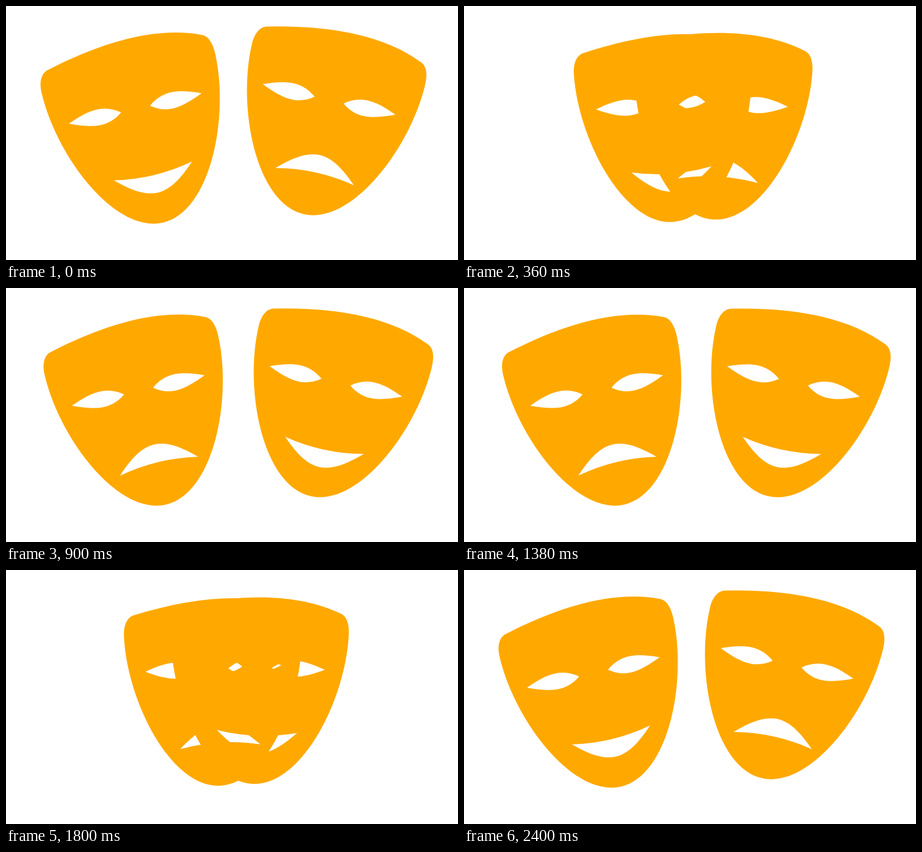
An HTML page with a canvas for the animation above (2.7 s loop, 800x450 px).

```html
<!DOCTYPE html>
<html lang="en">
<head>
<meta charset="utf-8">
<title>Masks</title>
<style>
  html, body { margin: 0; width: 100%; height: 100%; overflow: hidden; background: #fff; }
  canvas { display: block; }
</style>
</head>
<body>
<canvas id="stage" width="800" height="450"></canvas>
<script>
const ctx = document.getElementById('stage').getContext('2d');

const LOOP = 2700, TICK = 30, TILT = 13 * Math.PI / 180;
const LEFT_Y = 211.7, RIGHT_Y = 196.7;

// Resting x of each mask on either side
const smile = { left: 238, right: 579, turn: 1 };
const sad = { left: 243.3, right: 567, turn: -1 };

function addFace(path) {
  path.moveTo(-140, -132);
  path.bezierCurveTo(-30, -160.5, 68, -164, 142, -132);
  path.bezierCurveTo(152, -128, 157.5, -115, 157.5, -96);
  path.bezierCurveTo(157.5, 19, 87.6, 176.6, 0, 176.6);
  path.bezierCurveTo(-87.6, 176.6, -157.5, 19, -157.5, -96);
  path.bezierCurveTo(-157.5, -115, -151, -128, -140, -132);
  path.closePath();
}

// Lens with a sharp outer tip and a blunter inner one
function addEye(path, outer, inner) {
  const dir = Math.sign(inner - outer);
  const a = outer + 38 * dir, b = inner - 28 * dir;
  path.moveTo(outer, -31.5);
  path.bezierCurveTo(a, -47.2, b, -52.2, inner, -30.3);
  path.bezierCurveTo(b, -8.8, a, -15.2, outer, -31.5);
  path.closePath();
}

// turn = -1 is the same mouth rotated by half a turn
function addMouth(path, turn) {
  const p = (x, y) => [3.5 + turn * x, 95.5 + turn * y];
  path.moveTo(...p(-71, -11.2));
  path.quadraticCurveTo(...p(0, 3), ...p(71, -12.8));
  path.bezierCurveTo(...p(16, 40.4), ...p(-16, 40.4), ...p(-71, -11.2));
  path.closePath();
}

for (const mask of [smile, sad]) {
  mask.path = new Path2D();
  addFace(mask.path);
  addEye(mask.path, -122.6, -28.2);
  addEye(mask.path, 118.2, 24.4);
  addMouth(mask.path, mask.turn);
}

const lerp = (a, b, k) => a + (b - a) * k;

function ease(t, start, end) {
  const k = Math.min(1, Math.max(0, (t - start) / (end - start)));
  return k * k * (3 - 2 * k);
}

// side: 0 = left place, 1 = right place
function drawMask(mask, side) {
  ctx.save();
  ctx.translate(lerp(mask.left, mask.right, side), lerp(LEFT_Y, RIGHT_Y, side));
  ctx.rotate(lerp(-TILT, TILT, side));
  ctx.fill(mask.path, 'evenodd');
  ctx.restore();
}

function draw(now) {
  const t = Math.floor((now % LOOP) / TICK) * TICK;
  const swap = ease(t, 0, 900) - ease(t, 1350, 2400);
  ctx.fillStyle = '#fff';
  ctx.fillRect(0, 0, 800, 450);
  ctx.fillStyle = '#ffa900';
  drawMask(smile, swap);
  drawMask(sad, 1 - swap);
}

let begin;
function loop(now) {
  begin ??= now;
  draw(now - begin);
  requestAnimationFrame(loop);
}

draw(0);
requestAnimationFrame(loop);
</script>
</body>
</html>
```
